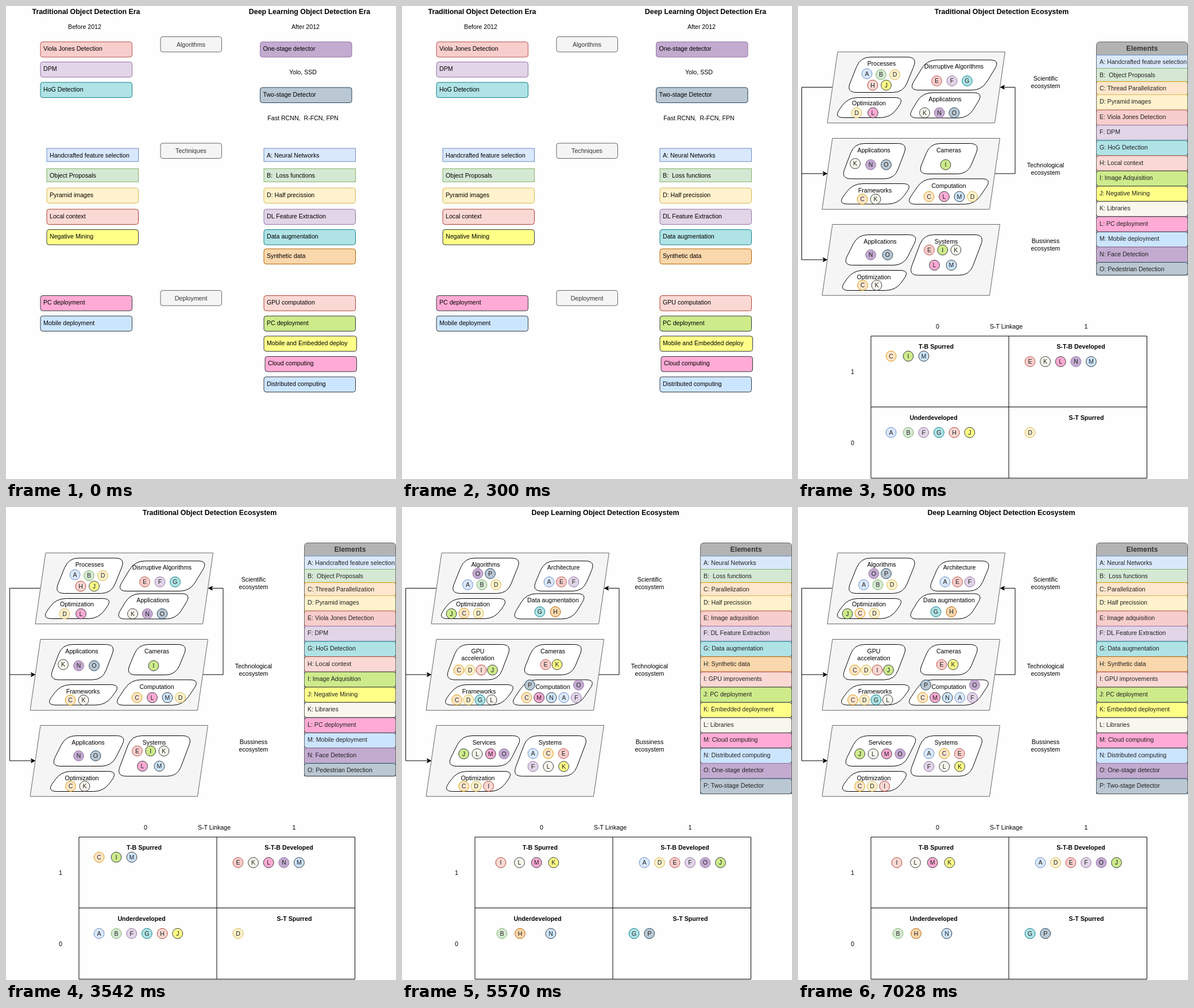
An HTML page that plays this animation: 679x824 px, repeating every 8000 ms.

```html
<!DOCTYPE html>
<html lang="en">
<head>
<meta charset="utf-8">
<title>Object detection ecosystems</title>
<style>
  html, body { margin: 0; width: 100%; height: 100%; overflow: hidden; background: #fefefe; }
  svg { display: block; width: 679px; height: 824px; font: 10.63px "Liberation Sans", Arial, sans-serif; }
  text { white-space: pre; }
  .mid { text-anchor: middle; }
  .bold { font-weight: bold; }
  .title { font-weight: bold; font-size: 12.4px; }
</style>
</head>
<body>
<svg id="stage" viewBox="0 0 679 824"></svg>
<script>
const LOOP = 8000;
const STARTS = [0, 500, 5570];

// fill and stroke pairs
const COLORS = {
  blue: ['#dae8fc', '#6c8ebf'], green: ['#d5e8d4', '#82b366'], peach: ['#ffe6cc', '#d79b00'],
  cream: ['#fff2cc', '#d6b656'], red: ['#f8cecc', '#b85450'], lilac: ['#e1d5e7', '#9673a6'],
  teal: ['#b0e3e6', '#0e8088'], orange: ['#fad7ac', '#b46504'], rose: ['#fad9d5', '#ae4132'],
  lime: ['#cdeb8b', '#36393d'], yellow: ['#ffff88', '#36393d'], ivory: ['#f9f7ed', '#36393d'],
  pink: ['#ffabd5', '#36393d'], sky: ['#cce5ff', '#36393d'], purple: ['#c3abd0', '#9673a6'],
  slate: ['#bac8d3', '#23445d'], grey: ['#f5f5f5', '#666666'], header: ['#b3b3b3', '#666666']
};
const DEEP_ORDER = ['blue', 'green', 'peach', 'cream', 'red', 'lilac', 'teal', 'orange',
  'rose', 'lime', 'yellow', 'ivory', 'pink', 'sky', 'purple', 'slate'];
const CLASSIC_ORDER = DEEP_ORDER.filter(name => name !== 'orange');

const paint = name => `fill="${COLORS[name][0]}" stroke="${COLORS[name][1]}"`;

// y is the middle of the capitals
const text = (x, y, label, cls = 'mid', fill = '#000') =>
  `<text x="${x}" y="${y + 3.9}" class="${cls}" fill="${fill}">${label}</text>`;

const box = (x, y, w, h, color, r = 4) =>
  `<rect x="${x}" y="${y}" width="${w}" height="${h}" rx="${r}" ${paint(color)}/>`;

const labelBox = (x, y, label, color, { w = 159.5, h = 26.5, r = 4 } = {}) =>
  box(x, y, w, h, color, r) + text(x + 5, y + 11.7, label, '');

const flatBox = (x, y, label, color) => labelBox(x, y, label, color, { h: 23, r: 0 });

const headBox = (y, label) =>
  box(269, y, 106.5, 26.5, 'grey') + text(322, y + 13.5, label, 'mid', '#333');

// Parallelogram whose corners are softened by quadratic curves
function slanted(x, y, w, h) {
  const dx = w * 0.2;
  const corners = [[x + dx, y], [x + w, y], [x + w - dx, y + h], [x, y + h]];
  const toward = ([ax, ay], [bx, by]) => {
    const length = Math.hypot(bx - ax, by - ay);
    const k = Math.min(17.7, length / 2) / length;
    return [ax + (bx - ax) * k, ay + (by - ay) * k];
  };
  const d = corners.map((corner, i) => {
    const before = toward(corner, corners[(i + 3) % 4]);
    const after = toward(corner, corners[(i + 1) % 4]);
    return `${i ? 'L' : 'M'}${before}Q${corner} ${after}`;
  }).join('');
  return `<path d="${d}Z" fill="#fff" stroke="#000"/>`;
}

// Row of lettered discs, evenly spaced
const discRow = order => (y, letters, x, step = 0) => [...letters].map((letter, i) => {
  const cx = x + i * step;
  const color = order[letter.charCodeAt(0) - 65];
  return `<circle cx="${cx}" cy="${y}" r="8.9" ${paint(color)}/>` + text(cx, y, letter, 'mid', '#222');
}).join('');

function legend(labels, order) {
  let y = 85.5;
  const rows = labels.map((label, i) => {
    const last = i === labels.length - 1;
    const h = i < 3 ? 23 : last && i === 14 ? 22.3 : 26.55;
    const row = box(519.5, y, 159, h, order[i], i < 2 ? 1 : 4) +
      text(525, y + 11.9, `${String.fromCharCode(65 + i)}: ${label}`, '', '#222');
    y += h;
    return row;
  }).join('');
  return `<path d="M519.5 85.5V69q0-6.5 6.5-6.5h146q6.5 0 6.5 6.5v16.500Z" ${paint('header')}/>` +
    text(599, 74.5, 'Elements', 'mid title', '#333') + rows +
    `<path d="M519.500 85.5V${y}H678.5V85.5" fill="none" stroke="#666"/>`;
}

const layer = (x, y) =>
  `<path d="M${x + 18} ${y}h291.500l-18 123.700h-291.500Z" ${paint('grey')}/>`;
const arrowHead = (x, y, dir) =>
  `<path d="M${x} ${y}l${-7 * dir}-3.500l${1.75 * dir} 3.500l${-1.75 * dir} 3.500Z" stroke="#000"/>`;

const frame = () =>
  layer(51, 80) + layer(42, 230.5) + layer(42, 380.5) +
  `<path d="M59.500 141.500H6.500V442H45M6.500 292H45M343 292H378V141.500H357" fill="none" stroke="#000"/>` +
  arrowHead(50.5, 292, 1) + arrowHead(50.5, 442, 1) + arrowHead(352.5, 141.5, -1) +
  [['Scientific', 126.5], ['Technological', 276.8], ['Bussiness', 409.5]].map(([name, y]) =>
    text(431, y, name) + text(431, y + 12.8, 'ecosystem')).join('') +
  `<path d="M127 575H607.500V822.500H127ZM367 575V822.500M127 698.500H607.500" fill="none" stroke="#000"/>` +
  text(243, 558, '0') + text(362.5, 558, 'S-T Linkage') + text(501.5, 558, '1') +
  text(95, 637.5, '1') + text(95, 761, '0') +
  text(240.5, 593, 'T-B Spurred', 'mid bold') + text(492.5, 593, 'S-T-B Developed', 'mid bold') +
  text(236, 717, 'Underdeveloped', 'mid bold') + text(502, 717, 'S-T Spurred', 'mid bold') +
  slanted(84, 89, 124, 61.5) + slanted(62, 159.5, 124, 35) + slanted(190, 151, 133, 44) +
  slanted(74.7, 239.5, 116.5, 61.5) + slanted(208.5, 239.5, 108.5, 53) +
  slanted(69, 309.5, 131, 35.5) + slanted(187.2, 301, 150.5, 44.3) +
  slanted(77.7, 398.5, 132.5, 53) + slanted(192, 398.5, 133, 70.5) + slanted(71, 460.5, 124, 35) +
  text(123.5, 169.5, 'Optimization') + text(262.5, 251, 'Cameras') + text(134, 321.5, 'Frameworks') +
  text(262.5, 313, 'Computation') + text(258, 410, 'Systems') + text(132, 472, 'Optimization');

function comparison() {
  return text(139.5, 10, 'Traditional Object Detection Era', 'mid title') +
    text(137, 36, 'Before 2012') +
    text(528.5, 10, 'Deep Learning Object Detection Era', 'mid title') +
    text(521.5, 36, 'After 2012') +
    headBox(53.5, 'Algorithms') + headBox(239, 'Techniques') + headBox(495.5, 'Deployment') +
    labelBox(60, 62.5, 'Viola Jones Detection', 'red') +
    labelBox(60, 97.5, 'DPM', 'lilac') +
    labelBox(60, 133, 'HoG Detection', 'teal') +
    labelBox(442.5, 62.5, 'One-stage detector', 'purple') + text(517, 115.5, 'Yolo, SSD') +
    labelBox(442.5, 142, 'Two-stage Detector', 'slate') + text(517, 195, 'Fast RCNN,  R-FCN, FPN') +
    flatBox(71, 248, 'Handcrafted feature selection', 'blue') +
    flatBox(71, 283.3, 'Object Proposals', 'green') +
    labelBox(71, 317, 'Pyramid images', 'cream') +
    labelBox(71, 354, 'Local context', 'rose') +
    labelBox(71, 389.5, 'Negative Mining', 'yellow') +
    flatBox(449, 248, 'A: Neural Networks', 'blue') +
    flatBox(449, 283.3, 'B:  Loss functions', 'green') +
    labelBox(449, 317, 'D: Half precission', 'cream') +
    labelBox(449, 354, 'DL Feature Extraction', 'lilac') +
    labelBox(449, 389.5, 'Data augmentation', 'teal') +
    labelBox(449, 423, 'Synthetic data', 'orange') +
    labelBox(60, 504.5, 'PC deployment', 'pink') +
    labelBox(60, 540, 'Mobile deployment', 'sky') +
    labelBox(449, 504.5, 'GPU computation', 'rose') +
    labelBox(449, 540, 'PC deployment', 'lime') +
    labelBox(449, 575, 'Mobile and Embedded deploy', 'yellow', { w: 161.5 }) +
    labelBox(451, 610.5, 'Cloud computing', 'pink') +
    labelBox(449, 646, 'Distributed computing', 'sky');
}

function classicEcosystem() {
  const discs = discRow(CLASSIC_ORDER);
  return text(354.5, 10, 'Traditional Object Detection Ecosystem', 'mid title') +
    frame() + slanted(192.500, 94, 159.5, 52.5) +
    text(145.5, 100.5, 'Processes') + text(271.5, 105, 'Disrruptive Algorithms') +
    text(256, 162.5, 'Applications') + text(132, 251, 'Applications') + text(143, 410, 'Applications') +
    discs(118, 'A', 120) + discs(119.5, 'BD', 144.5, 24) + discs(138, 'HJ', 130, 23.5) +
    discs(130.5, 'EFG', 241.5, 26.5) + discs(186, 'DL', 102, 28.5) + discs(186, 'KNO', 220.5, 25.7) +
    discs(274.5, 'K', 99.5) + discs(276.5, 'NO', 126.5, 27) + discs(276.5, 'I', 257) +
    discs(336.5, 'CK', 112, 23) + discs(332, 'CLM', 228, 26.5) + discs(332, 'D', 303.5) +
    discs(433.5, 'NO', 126.5, 29.5) + discs(425, 'EIK', 228.5, 23.2) + discs(451.5, 'LM', 237.5, 29.5) +
    discs(486.5, 'CK', 112.5, 24.5) +
    discs(610, 'C', 162) + discs(610, 'IM', 192, 27) + discs(619.5, 'EKLNM', 404, 26.6) +
    discs(743, 'A', 162) + discs(743, 'BFGHJ', 192, 26.7) + discs(743, 'D', 404) +
    legend(['Handcrafted feature selection', ' Object Proposals', 'Thread Parallelization',
      'Pyramid images', 'Viola Jones Detection', 'DPM', 'HoG Detection', 'Local context',
      'Image Adquisition', 'Negative Mining', 'Libraries', 'PC deployment', 'Mobile deployment',
      'Face Detection', 'Pedestrian Detection'], CLASSIC_ORDER);
}

function deepEcosystem() {
  const discs = discRow(DEEP_ORDER);
  return text(354, 10, 'Deep Learning Object Detection Ecosystem', 'mid title') +
    frame() + slanted(226, 94, 111, 52.5) +
    text(145.5, 100.5, 'Algorithms') + text(281, 105, 'Architecture') +
    text(263, 162.5, 'Data augmentation') + text(132, 251, 'GPU') + text(132, 263.5, 'acceleration') +
    text(143, 410, 'Services') +
    discs(116, 'OP', 132, 21.5) + discs(135.5, 'ABD', 114.5, 24.5) + discs(130.5, 'AEF', 256, 21.5) +
    discs(186, 'J', 86) + discs(185, 'CD', 108, 25) + discs(182.5, 'GH', 240, 27) +
    discs(284, 'CDIJ', 99, 19.5) + discs(274.5, 'EK', 250, 20) + discs(336, 'CDGL', 95.5, 20.2) +
    discs(310, 'PO', 222.5, 85) + discs(332, 'CMNAF', 217, 21.6) +
    discs(430, 'JLMO', 107.5, 23.4) + discs(429.5, 'ACE', 228, 26.6) + discs(452, 'FLK', 228, 26.8) +
    discs(486.5, 'CDI', 107.5, 21.6) +
    discs(619.5, 'I', 172) + discs(619.5, 'LMK', 204.5, 29.7) + discs(619.5, 'ADEFOJ', 422, 26.5) +
    discs(743, 'BH', 174, 31.5) + discs(743, 'N', 259) + discs(743, 'GP', 404, 26.7) +
    legend(['Neural Networks', ' Loss functions', 'Parallelization', 'Half precission',
      'Image adquisition', 'DL Feature Extraction', 'Data augmentation', 'Synthetic data',
      'GPU improvements', 'PC deployment', 'Embedded deployment', 'Libraries', 'Cloud computing',
      'Distributed computing', 'One-stage detector', 'Two-stage Detector'], DEEP_ORDER);
}

const stage = document.getElementById('stage');
stage.innerHTML = [comparison, classicEcosystem, deepEcosystem]
  .map(draw => `<g visibility="hidden">${draw()}</g>`).join('');
const scenes = [...stage.children];

const startTime = performance.now();
function render() {
  const t = (performance.now() - startTime) % LOOP;
  const current = STARTS.filter(start => start <= t).length - 1;
  scenes.forEach((scene, i) => scene.setAttribute('visibility', i === current ? 'visible' : 'hidden'));
  requestAnimationFrame(render);
}
render();
</script>
</body>
</html>
```
